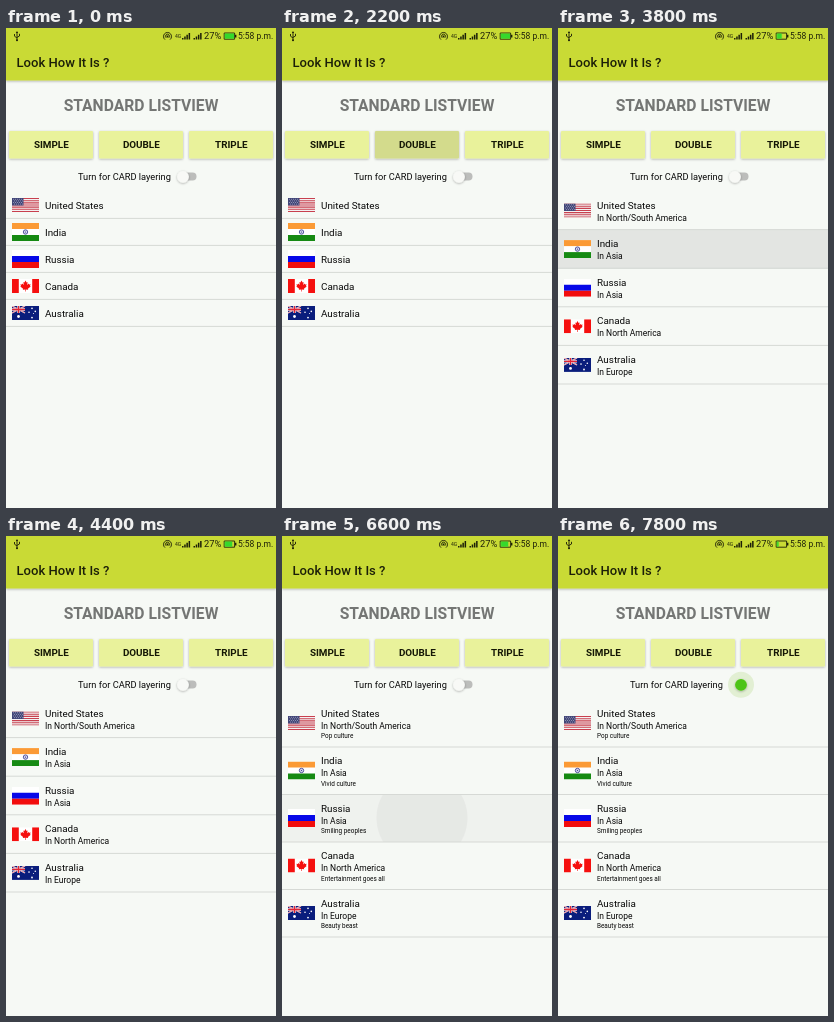
An HTML page that plays this animation: 270x480 px, repeating every 8 s.

```html
<!DOCTYPE html>
<html lang="en">
<head>
<meta charset="utf-8">
<title>Standard listview</title>
<style>
html, body { margin: 0; width: 100%; height: 100%; overflow: hidden; background: #f6f9f5; }
svg { display: block; }
#stage { width: 100vw; height: 100vh; font-family: Roboto, Inter, sans-serif; }
.bold { font-weight: 700; }
.name { font-size: 9.85px; fill: #080808; }
.sub { font-size: 8.5px; fill: #080808; }
.note { font-size: 6.4px; fill: #080808; }
.list, .press, .wave, .tap, #thumb, #track, #halo { animation: 8s linear infinite; }

/* lists swap with hard cuts */
.list { animation-timing-function: step-end; }
#list1 { animation-name: first; }
#list2 { animation-name: second; }
#list3 { animation-name: third; }
@keyframes first { 0% { opacity: 1 } 30%, 100% { opacity: 0 } }
@keyframes second { 0% { opacity: 0 } 30% { opacity: 1 } 60%, 100% { opacity: 0 } }
@keyframes third { 0% { opacity: 0 } 60%, 100% { opacity: 1 } }

/* row presses */
.press { opacity: 0; }
#press1 { animation-name: press1; }
#press2 { animation-name: press2; }
#press3 { animation-name: press3; }
@keyframes press1 { 0%, 15% { opacity: 0 } 17.5% { opacity: .8 } 20% { opacity: .5 } 25%, 100% { opacity: 0 } }
@keyframes press2 { 0%, 42.5% { opacity: 0 } 45%, 50% { opacity: 1 } 55%, 100% { opacity: 0 } }
@keyframes press3 { 0%, 80% { opacity: 0 } 82.5% { opacity: .8 } 85%, 100% { opacity: 0 } }
#wave1 { animation-name: wave1; }
#wave2 { animation-name: wave2; }
#wave3 { animation-name: wave3; }
@keyframes wave1 { 0%, 15% { r: 0 } 17.5% { r: 42px } 22.5%, 100% { r: 150px } }
@keyframes wave2 { 0%, 42.5% { r: 0 } 47.5%, 100% { r: 150px } }
@keyframes wave3 { 0%, 80% { r: 0 } 82.5% { r: 45px } 85%, 100% { r: 150px } }

/* button taps */
.tap { opacity: 0; }
#tap1 { animation-name: tap1; }
#tap2 { animation-name: tap2; }
@keyframes tap1 { 0%, 26% { opacity: 0 } 28% { opacity: .12 } 33%, 100% { opacity: 0 } }
@keyframes tap2 { 0%, 56% { opacity: 0 } 58% { opacity: .12 } 63%, 100% { opacity: 0 } }

#thumb { animation-name: thumb; }
#track { animation-name: track; }
#halo { animation-name: halo; }
@keyframes thumb {
  0%, 95% { transform: none; fill: #f8f9f6 }
  97.5%, 100% { transform: translateX(6px); fill: #4ec412 }
}
@keyframes track { 0%, 95% { fill: #bcbdbb } 97.5%, 100% { fill: #d3e6c2 } }
@keyframes halo { 0%, 94% { r: 0; opacity: 0 } 97.5%, 100% { r: 13px; opacity: 1 } }
</style>
</head>
<body>
<svg id="stage" viewBox="0 0 270 480" preserveAspectRatio="none">
  <defs>
    <filter id="soft" x="-20%" y="-30%" width="140%" height="170%">
      <feDropShadow dx="0" dy=".8" stdDeviation=".9" flood-opacity=".3"/>
    </filter>
    <symbol id="flag0" viewBox="0 0 27 14">
      <path fill="#f4f1f2" d="M0 0h27v14H0z"/>
      <path stroke="#c8404e" stroke-width="1.08" d="M0 .54h27M0 2.7h27M0 4.85h27M0 7h27M0 9.15h27M0 11.3h27M0 13.46h27"/>
      <path fill="#414678" d="M0 0h11.5v7.5H0z"/>
      <path stroke="#c9cbdd" stroke-width=".7" stroke-dasharray=".8 1.2" d="M1 1.3h10M2 2.9h9M1 4.5h10M2 6.1h9"/>
    </symbol>
    <symbol id="flag1" viewBox="0 0 27 18">
      <path fill="#fff" d="M0 0h27v18H0z"/>
      <path fill="#fb9a35" d="M0 0h27v6H0z"/>
      <path fill="#168a13" d="M0 12h27v6H0z"/>
      <circle cx="13.5" cy="9" r="2.2" fill="#d5d6ee" stroke="#33358c" stroke-width=".8"/>
      <circle cx="13.5" cy="9" r=".6" fill="#33358c"/>
    </symbol>
    <symbol id="flag2" viewBox="0 0 27 18">
      <path fill="#fff" d="M0 0h27v18H0z"/>
      <path fill="#0708e8" d="M0 6h27v6H0z"/>
      <path fill="#f20d0d" d="M0 12h27v6H0z"/>
    </symbol>
    <symbol id="flag3" viewBox="0 0 27 14">
      <path fill="#fff" d="M0 0h27v14H0z"/>
      <path fill="#f5100f" d="M0 0h6.8v14H0zM20.2 0H27v14h-6.8zM13.5 1.6l1.1 2 1-.5-.4 2.9 1.5-1.4.4.9 1.5-.2-.6 1.7.7.5-2.8 2.2.3 1-2.4-.3v2.2h-.6v-2.2l-2.4.3.3-1-2.8-2.2.7-.5-.6-1.7 1.5.2.4-.9 1.5 1.4-.4-2.9 1 .5z"/>
    </symbol>
    <symbol id="flag4" viewBox="0 0 27 14">
      <path fill="#0a1d7c" d="M0 0h27v14H0z"/>
      <path stroke="#fff" stroke-width="1.4" d="M0 0l13 7M13 0L0 7"/>
      <path stroke="#fff" stroke-width="2.4" d="M6.5 0v7M0 3.5h13"/>
      <path stroke="#df2434" stroke-width=".5" d="M0 0l13 7M13 0L0 7"/>
      <path stroke="#df2434" stroke-width="1.3" d="M6.5 0v7M0 3.5h13"/>
      <g fill="#fff"><circle cx="6.5" cy="10.5" r="1.4"/><circle cx="20" cy="2.4" r=".8"/><circle cx="17" cy="6.2" r=".8"/><circle cx="23.3" cy="5.4" r=".8"/><circle cx="20" cy="11.6" r=".9"/><circle cx="21.5" cy="7.6" r=".5"/></g>
    </symbol>
    <clipPath id="row1"><path d="M0 190.5h270V217H0z"/></clipPath>
    <clipPath id="row2"><path d="M0 202h270v38.3H0z"/></clipPath>
    <clipPath id="row3"><path d="M0 259h270v47H0z"/></clipPath>
  </defs>

  <path fill="#f6f9f5" d="M0 0h270v480H0z"/>
  <path fill="#c9da36" d="M0 0h270v52.5H0z" filter="url(#soft)"/>

  <g id="status" fill="#1c1f08">
    <path d="M11 4v8.5M8.5 6v2.2L11 10M13.5 5.8V8L11 9.4" fill="none" stroke="#1c1f08" stroke-width=".9"/>
    <path d="M9.9 5L11 3l1.1 2z"/><circle cx="11" cy="12.3" r="1"/>
    <g fill="none" stroke="#1c1f08" stroke-width=".9">
      <path d="M159 11.6a4 4 0 1 1 5 0M160.2 9.8a2 2 0 1 1 2.6 0"/>
    </g>
    <circle cx="161.5" cy="8.5" r="1"/>
    <text x="169" y="9.6" font-size="5">4G</text>
    <path id="bars" d="M176 11.5V10h1.5v1.5zM178.2 11.5V8.5h1.5v3zM180.4 11.5V6.8h1.5v4.7zM182.6 11.5V5h1.5v6.5z"/>
    <use href="#bars" x="11.5"/>
    <text x="198" y="11.3" font-size="9.3">27%</text>
    <path d="M218.2 5h10.4v6.2h-10.4z" fill="none" stroke="#1c1f08" stroke-width=".9"/>
    <path d="M229 6.8h1.4v2.6H229z"/>
    <path id="charge" fill="#35d92c" d="M218.7 5.5h9.4v5.2h-9.4z"/>
    <text x="232" y="11.2" font-size="8.5">5:58 p.m.</text>
  </g>

  <text x="10.5" y="39.3" font-size="13.05" font-weight="500" fill="#1c1f08">Look How It Is ?</text>
  <text class="bold" x="135" y="82.7" font-size="15.7" text-anchor="middle" fill="#747674">STANDARD LISTVIEW</text>
  <g id="buttons"></g>
  <text x="72" y="152" font-size="9.25" fill="#080808">Turn for CARD layering</text>
  <rect id="track" x="173" y="144.5" width="17.5" height="8" rx="4"/>
  <circle id="halo" cx="183" cy="148.8" fill="#e2efd3"/>
  <circle id="thumb" cx="177" cy="148.8" r="5.9" filter="url(#soft)"/>

  <g id="presses" fill="#e3e5e2"></g>
  <g id="lists"></g>
</svg>
<script>
const $ = id => document.getElementById(id);
const text = (cls, x, y, s) => `<text class="${cls}" x="${x}" y="${y}">${s}</text>`;

const countries = [
  ['United States', 'In North/South America', 'Pop culture'],
  ['India', 'In Asia', 'Vivid culture'],
  ['Russia', 'In Asia', 'Smiling peoples'],
  ['Canada', 'In North America', 'Entertainment goes all'],
  ['Australia', 'In Europe', 'Beauty beast']
];
const flagHeights = [14, 18, 18, 14, 14];
const styles = ['name', 'sub', 'note'];
const baselines = [180.6, 192.6, 202.2];
const layouts = [
  { pitch: 27, flag: 177, line: 190.4 },
  { pitch: 38.6, flag: 182.5, line: 201.6 },
  { pitch: 47.5, flag: 187, line: 211 }
];

$('lists').innerHTML = layouts.map(({ pitch, flag, line }, n) =>
  `<g class="list" id="list${n + 1}">` + countries.map((words, i) => {
    const dy = i * pitch;
    const h = flagHeights[i];
    return `<use href="#flag${i}" x="6" y="${flag + dy - h / 2}" width="27" height="${h}"/>` +
      words.slice(0, n + 1).map((w, k) => text(styles[k], 39, baselines[k] + dy, w)).join('') +
      `<path stroke="#d6d9d5" d="M0 ${line + dy}h270"/>`;
  }).join('') + '</g>').join('');

$('buttons').innerHTML = ['SIMPLE', 'DOUBLE', 'TRIPLE'].map((label, i) => {
  const x = 3 + 90 * i;
  const box = `x="${x}" y="103" width="84" height="27.5" rx="1"`;
  return `<rect ${box} fill="#e9f29b" filter="url(#soft)"/>` +
    (i ? `<rect ${box} class="tap" id="tap${i}"/>` : '') +
    `<text class="bold" x="${x + 42.3}" y="120.4" font-size="9.85" text-anchor="middle" fill="#151705">${label}</text>`;
}).join('');

$('presses').innerHTML = [[143, 204], [135, 221], [140, 282]].map(([x, y], i) => {
  const n = i + 1;
  return `<g class="press" id="press${n}" clip-path="url(#row${n})">
    <path d="M0 160h270v150H0z" opacity=".45"/>
    <circle class="wave" id="wave${n}" cx="${x}" cy="${y}"/></g>`;
}).join('');

// Charging battery: one of six levels every 400 ms
const levels = [1, .12, .22, .38, .55, .8];
const frames = [];
for (let t = 0, k = 0; t < 8000; t = 400 * ++k - 200) {
  frames.push({ offset: t / 8000, transform: `scaleX(${levels[k % 6]})`, easing: 'step-end' });
}
frames.push({ offset: 1, transform: 'scaleX(1)' });
$('charge').style.transformOrigin = '218.7px 0';
$('charge').animate(frames, { duration: 8000, iterations: Infinity });
</script>
</body>
</html>
```
